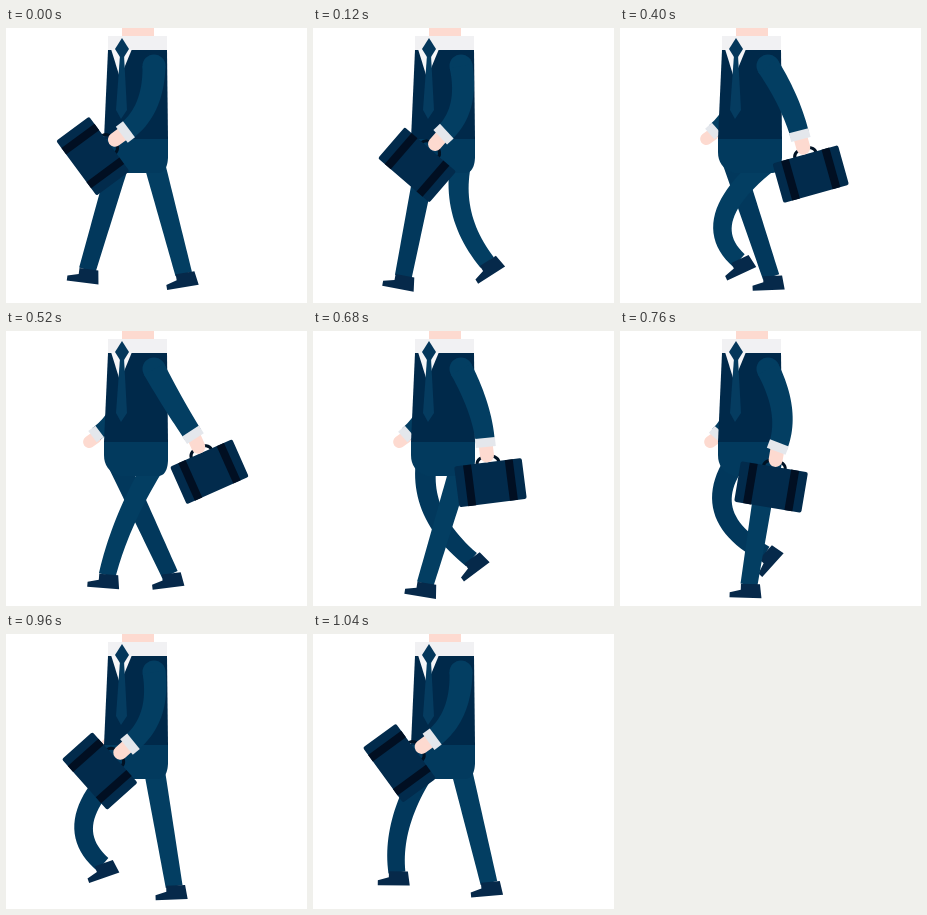
Animation, 301 px wide and 275 px high, one loop 1.08 s. Source, as an HTML page with a canvas:

```html
<!DOCTYPE html>
<html lang="en">
<head>
<meta charset="utf-8">
<title>Walking businessman</title>
<style>
html, body { margin: 0; width: 100%; height: 100%; overflow: hidden; background: #fff; }
canvas { display: block; }
</style>
</head>
<body>
<canvas id="stage" width="301" height="275"></canvas>
<script>
const ctx = document.getElementById('stage').getContext('2d');
const { sin, cos, PI } = Math;
const LOOP = 1080, STEP = 40;
const SKIN = '#fddad0', CLOTH = '#033e62', HIP = '#023a5e', JACKET = '#00294a';

function poly(color, ...pts) {
  ctx.fillStyle = color;
  ctx.beginPath();
  for (let i = 0; i < pts.length; i += 2) ctx.lineTo(pts[i], pts[i + 1]);
  ctx.fill();
}

function line(color, width, cap, x0, y0, x1, y1) {
  ctx.strokeStyle = color;
  ctx.lineWidth = width;
  ctx.lineCap = cap;
  ctx.beginPath();
  ctx.moveTo(x0, y0);
  ctx.lineTo(x1, y1);
  ctx.stroke();
}

// Tapered limb along a quadratic curve
function limb(color, x0, y0, cx, cy, x1, y1, w0, w1) {
  const left = [], right = [];
  for (let i = 0; i <= 24; i++) {
    const u = i / 24, v = 1 - u;
    const x = v * v * x0 + 2 * u * v * cx + u * u * x1;
    const y = v * v * y0 + 2 * u * v * cy + u * u * y1;
    const dx = v * (cx - x0) + u * (x1 - cx), dy = v * (cy - y0) + u * (y1 - cy);
    const r = (w0 * v + w1 * u) / 2 / Math.hypot(dx, dy);
    left.push(x - dy * r, y + dx * r);
    right.unshift(x + dy * r, y - dx * r);
  }
  poly(color, ...left, ...right);
}

function placed(x, y, deg, draw) {
  ctx.save();
  ctx.translate(x, y);
  ctx.rotate(deg * PI / 180);
  draw();
  ctx.restore();
}

// The foot swings forward (left) while p runs from 0 to PI, then stays on the ground
function leg(color, p, hip, mid, reach, ground) {
  const x = mid + reach * cos(p - 0.12) - 3 * cos(2 * p);
  const y = ground - 14 * sin(p) + 3 * cos(2 * p);
  const bend = 60 * Math.max(0, sin(p) * (1 - cos(p) / 2));
  const tilt = -13 - 25 * cos(p - 1.22) + 12 * cos(2 * p);
  limb(color, hip, 134, (hip + x) / 2 - bend, (134 + y) / 2 + bend / 6, x, y, 21, 17);
  placed(x, y, tilt, () => poly('#06294a', -8, -1, 11, -1, 13, 13, -19, 13, -19, 8, -8, 5));
}

function cuff(cx, cy, x, y, width) {
  const d = Math.hypot(x - cx, y - cy), dx = (x - cx) / d * 4.5, dy = (y - cy) / d * 4.5;
  line('#e4e7ec', width, 'butt', x - dx, y - dy, x + dx, y + dy);
}

function briefcase() {
  ctx.strokeStyle = '#001224';
  ctx.lineWidth = 3;
  ctx.beginPath();
  ctx.moveTo(-11, 1);
  ctx.bezierCurveTo(-11, -9, 11, -9, 11, 1);
  ctx.stroke();
  ctx.fillStyle = '#022b4c';
  ctx.beginPath();
  ctx.roundRect(-34, 0, 68, 41, 2);
  ctx.fill();
  ctx.fillStyle = '#010f22';
  ctx.fillRect(-25, 0, 8, 41);
  ctx.fillRect(17, 0, 8, 41);
}

function farArm(p) {
  const x = 100 + 10 * cos(p), y = 103;
  line(SKIN, 12, 'round', x, y + 3, x - 7, y + 8);
  limb(CLOTH, 122, 45, 118, 84, x, y, 18, 14);
  cuff(110, 88, x, y, 14);
}

function nearArm(p) {
  const swing = cos(p + 0.15), shoulder = [148, 38];
  const x = 153 - 34 * swing, y = 109 - 5 * cos(2 * p) - 3 * sin(p);
  const elbowX = (shoulder[0] + x) / 2 + 6 + 14 * sin(p) ** 2 + 8 * swing;
  const elbowY = (shoulder[1] + y) / 2 + 6 + 6 * swing;
  placed(x, y, 15 + 39 * swing, () => {
    ctx.translate(0, 20);
    briefcase();
    line(SKIN, 14, 'round', 0, -20, 0, -7);
  });
  ctx.fillStyle = CLOTH;
  ctx.beginPath();
  ctx.arc(...shoulder, 11.5, 0, 2 * PI);
  ctx.fill();
  limb(CLOTH, ...shoulder, elbowX, elbowY, x, y, 23, 19);
  cuff(elbowX, elbowY, x, y, 20);
}

function hips() {
  ctx.fillStyle = HIP;
  ctx.beginPath();
  ctx.moveTo(98, 110);
  ctx.lineTo(162, 110);
  ctx.lineTo(162, 130);
  ctx.quadraticCurveTo(161, 145, 152, 145);
  ctx.lineTo(114, 145);
  ctx.quadraticCurveTo(98, 140, 98, 124);
  ctx.fill();
}

function torso() {
  poly(SKIN, 116, 0, 148, 0, 148, 9, 116, 9);
  poly('#f1f1f3', 102, 8, 161, 8, 161, 24, 102, 24);
  poly(JACKET, 102, 22, 161, 22, 162, 111, 98, 111);
  poly('#f6f6f8', 105, 21, 126, 21, 114, 50);
  poly('#053c60', 114, 27, 118, 27, 121, 82, 115, 91, 110, 82);
  poly('#04375b', 116, 10, 123, 21, 118, 29, 114, 29, 109, 21);
}

function draw(t) {
  const p = 2 * PI * t / LOOP;
  ctx.fillStyle = '#fff';
  ctx.fillRect(0, 0, 301, 275);
  farArm(p);
  leg('#02385c', p + PI, 113, 126, 42, 239);
  leg(CLOTH, p, 148, 142, 39, 243);
  hips();
  torso();
  nearArm(p);
}

function tick() {
  draw(Math.floor(performance.now() % LOOP / STEP) * STEP);
  requestAnimationFrame(tick);
}
tick();
</script>
</body>
</html>
```
